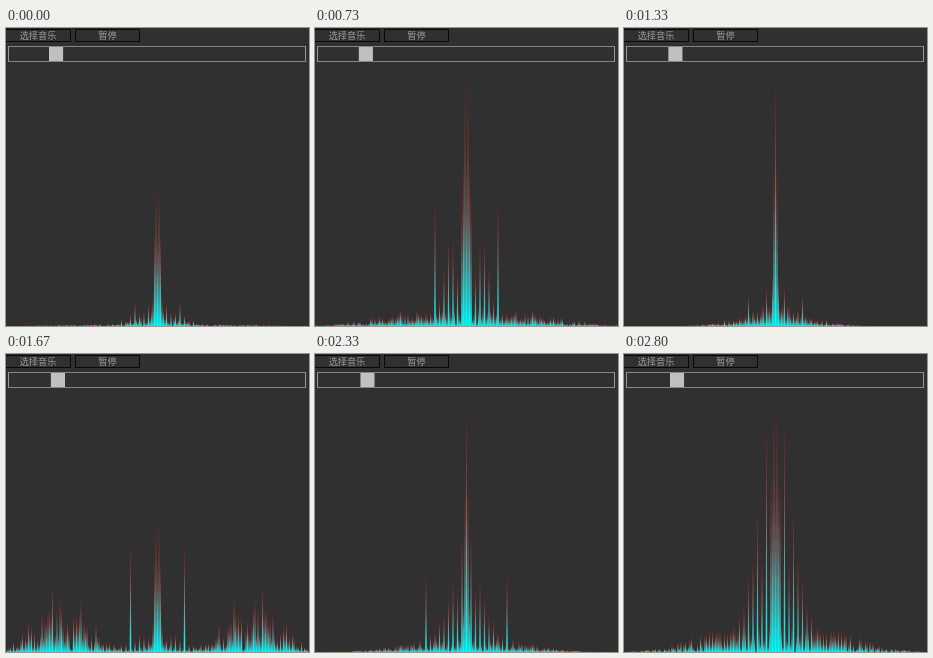
Write an HTML page with a canvas that moves like this. It is 303x298 px and loops after 2.87 s.

```html
<!DOCTYPE html>
<html lang="zh">
<meta charset="utf-8">
<style>
html, body { margin: 0; width: 100%; height: 100%; overflow: hidden; background: #303030; }
canvas, div { position: absolute; box-sizing: border-box; }
canvas { left: 0; top: 0; }
.button {
  top: 1px; height: 13px; border: 1px solid #080808;
  color: #9c9c9c; font: 300 9.2px/11px "Noto Sans CJK SC", "Noto Sans CJK", sans-serif;
  text-align: center; white-space: nowrap;
}
.track { left: 2px; top: 18px; width: 298px; height: 16px; border: 1px solid #999; border-block-color: #858585; }
</style>
<canvas width="303" height="298"></canvas>
<div class="button" style="left:-1px;width:66px">选择音乐</div>
<div class="button" style="left:69px;width:65px">暂停</div>
<div class="track"></div>
<script>
const LOOP = 2870, STEPS = 43, STEP_RATE = 0.015;
const PITCH = 1.5, BARS = 101, CENTER = 151.5, FLOOR = 298;
const ctx = document.querySelector("canvas").getContext("2d");

// core: central beam, double when split; glow: harmonics beside it;
// lead: strongest harmonic and its height; bed: outer noise around mid
const poses = [
  { at: 0, core: 140, split: 1, glow: 35, lead: [5, 25], bed: 3, mid: 30, reach: 80 },
  { at: 7, core: 156, split: 1, glow: 70, lead: [6, 48], bed: 24, mid: 70, reach: 120 },
  { at: 11, core: 247, split: 1, glow: 150, lead: [7, 128], bed: 22, mid: 40, reach: 65 },
  { at: 20, core: 249, split: 0, glow: 45, lead: [6, 33], bed: 12, mid: 30, reach: 35 },
  { at: 25, core: 133, split: 1, glow: 40, lead: [6, 110], bed: 80, mid: 96, reach: 36 },
  { at: 35, core: 252, split: 0, glow: 150, lead: [9, 80], bed: 14, mid: 40, reach: 50 },
  { at: 42, core: 251, split: 1, glow: 230, lead: [2, 234], bed: 28, mid: 40, reach: 60 }
];

const mix = (a, b, p) => a + (b - a) * p;
const bell = x => Math.exp(-x * x);

function rand(a, b) {
  const v = Math.sin(a * 127.1 + b * 311.7) * 43758.5453;
  return v - Math.floor(v);
}

// every third bar is a harmonic of the central tone
function tone(pose, k) {
  const d = k * PITCH;
  const core = pose.core * bell((d - pose.split * PITCH) / 2.4);
  if (!k || k % 3) return core;
  const [lead, height] = pose.lead;
  const harmonic = k / 3 === lead ? height
    : pose.glow * bell(d / 28) * (0.4 + 0.6 * rand(k, pose.at));
  return Math.max(core, harmonic);
}

const bedHeight = (pose, d) => pose.bed * bell((d - pose.mid) / pose.reach) + 18 * bell(d / 22);

const gradient = ctx.createLinearGradient(0, 0, 0, -1);
gradient.addColorStop(0, "#0ff");
gradient.addColorStop(1, "#f00");
const spike = new Path2D("M-.85 0L0-1L.85 0Z");

function drawBars(step) {
  const next = Math.max(1, poses.findIndex(pose => pose.at >= step));
  const a = poses[next - 1], b = poses[next];
  const p = (step - a.at) / (b.at - a.at);
  const beat = Math.floor(step / 3);

  ctx.fillStyle = gradient;
  for (let k = 0; k < BARS; k++) {
    const d = k * PITCH;
    const noise = mix(rand(k, beat), rand(k, beat + 1), step / 3 - beat) ** 1.2;
    const bed = noise * mix(bedHeight(a, d), bedHeight(b, d), p);
    const height = Math.max(bed, mix(tone(a, k), tone(b, k), p));
    for (const x of k ? [-d, d] : [0]) {
      ctx.setTransform(1, 0, 0, height, CENTER + x, FLOOR);
      ctx.fill(spike);
    }
  }
}

function draw(t) {
  let step = Math.min(STEPS - 1, Math.ceil(t * STEP_RATE));
  while (Math.round(step / STEP_RATE / 10) * 10 > t) step--;

  ctx.setTransform(1, 0, 0, 1, 0, 0);
  ctx.clearRect(0, 0, 303, 298);
  ctx.fillStyle = "#c0c0c0";
  ctx.fillRect(43 + Math.floor((t + 80) / 250) * 0.27, 19, 14.1, 14);
  drawBars(step);
}

const start = performance.now();
function tick() {
  draw((performance.now() - start) % LOOP);
  requestAnimationFrame(tick);
}
tick();
</script>
</html>
```
